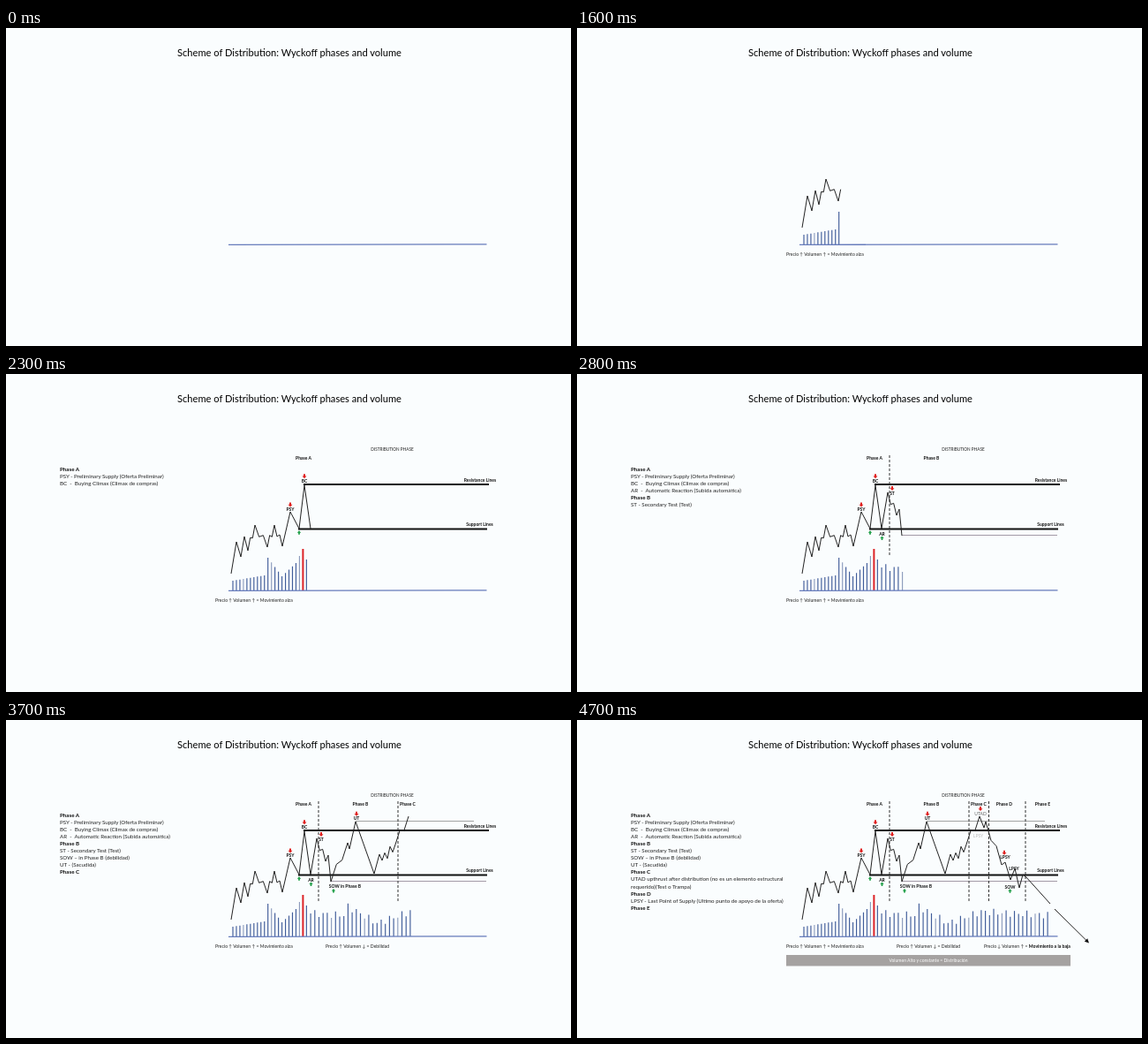
An HTML page that plays this animation: 640x360 px, repeating every 5 s.

```html
<!DOCTYPE html>
<html lang="en">
<head>
<meta charset="utf-8">
<title>Scheme of Distribution</title>
<style>
  html, body { margin: 0; width: 100%; height: 100%; overflow: hidden; background: #fafdfe; }
  svg { display: block; width: 100%; height: 100%; }
  text { font-family: Lato, "DejaVu Sans", sans-serif; fill: #222; white-space: pre; }
  .b { font-weight: 700; fill: #111; }
</style>
</head>
<body>
<svg id="stage" viewBox="0 0 640 360"></svg>
<script>
const LOOP = 5000, STEP = 100;
const stage = document.getElementById('stage');
const parts = [];

// Linear interpolation through [input, value] keys
function along(keys, v) {
  if (v >= keys.at(-1)[0]) return keys.at(-1)[1];
  const i = Math.max(1, keys.findIndex(k => k[0] > v));
  const [a, p] = keys[i - 1], [b, q] = keys[i];
  return p + (q - p) * (v - a) / (b - a);
}

// A part appears once the drawing edge has reached its "from"
function add(tag, attrs, from = 0, text) {
  const el = document.createElementNS('http://www.w3.org/2000/svg', tag);
  for (const k in attrs) el.setAttribute(k, attrs[k]);
  if (text) el.textContent = text;
  stage.appendChild(el);
  if (from) parts.push({ el, from });
  return el;
}
const line = (from, x1, y1, x2, y2, stroke, width, more) =>
  add('line', { x1, y1, x2, y2, stroke, 'stroke-width': width, ...more }, from);
const label = (from, x, y, size, text, more) =>
  add('text', { x, y, 'font-size': size, ...more }, from, text);
const mid = { 'text-anchor': 'middle' };
const bold = { class: 'b' };
const midBold = { ...mid, ...bold };

label(0, 321, 32, 11.12, 'Scheme of Distribution: Wyckoff phases and volume', { ...mid, style: 'fill:#000' });

// Volume: a rough envelope, with ripple after the climax
const BARS = 63, CLIMAX = 20;
const envelope = [[0, 234], [9, 228], [10, 208], [14, 229], [18, 214], [CLIMAX, 198], [21, 210],
  [22, 219], [30, 221], [31, 211], [38, 230], [46, 217], [62, 221]];
for (let i = 0; i < BARS; i++) {
  const x = i < 22 ? 257 + 3.97 * i : 340.4 + 4.7 * (i - 21);
  const y = along(envelope, i) + (i > 22 ? 4 * Math.sin(2.4 * i) : 0);
  const color = i === CLIMAX ? '#dc2226' : i % 8 === 3 ? '#8d9cbd' : '#3f5b99';
  line(x, x, y, x, 245, color, i === CLIMAX ? 2 : 1.15);
}
line(0, 252, 245.4, 544.5, 244.9, '#667bbb', 1.3);

// Levels
line(338, 337, 125, 547, 125, '#111', 2);
line(340, 331, 175.5, 545, 175.5, '#111', 2);
line(368, 368, 182.5, 544, 182.5, '#9a8f9c', 0.9);
line(396, 396, 114.5, 530, 114.5, '#999', 0.9);
label(338, 537, 122, 5, 'Resistance Lines', midBold);
label(340, 536.5, 172, 5, 'Support Lines', midBold);

// Phases: name, label position, left border
[['A', 337, 0], ['B', 401.5, 354], ['C', 455, 444], ['D', 484, 466.5], ['E', 527.5, 508]].forEach(([name, x, border]) => {
  label(border || 310, x, 97, 5, 'Phase ' + name, midBold);
  if (border) line(border, border, 92, border, 207, '#333', 1, { 'stroke-dasharray': '3 2' });
});
label(315, 437.5, 87, 4.7, 'DISTRIBUTION PHASE', mid);

// Price: swings [x, y, pullbacks on the way]
const swings = [[255, 226], [261, 190], [266, 207], [270, 184], [274, 200], [282, 171, 1], [296, 196, 1],
  [304, 171, 1], [313, 195, 1], [322, 156], [332, 175], [338, 126], [345, 175], [352, 134], [362, 160, 1],
  [365, 153], [368, 183], [387, 139, 1], [389, 146], [396, 115], [417, 174], [423, 152], [426, 159],
  [441, 141, 2], [456, 109, 1], [461, 122], [463, 115], [481, 164, 1], [485, 161], [491, 181],
  [496, 168], [501, 190], [505, 175], [508, 177], [536, 208]];
const PULLBACK = 5;
const points = swings.flatMap(([x, y, pulls = 0], i) => {
  const [x0, y0] = swings[i - 1] || [x, y];
  const n = 2 * pulls + 1;
  return Array.from({ length: n }, (_, j) => {
    const k = (j + 1) / n;
    const off = j === n - 1 ? 0 : PULLBACK * Math.sign(y - y0) * (j % 2 ? -1 : 1);
    return [x0 + (x - x0) * k, y0 + (y - y0) * k + off];
  });
});
const price = add('polyline', { fill: 'none', stroke: '#222', 'stroke-width': 1 });
line(570, 541, 214, 577, 249.5, '#222', 1);
add('path', { d: 'M580 252.5l-5.2 -1.8l3.4 -3.4z', fill: '#111' }, 570);

// Named turns: a high has its arrow above the label, a low has it below
function turn(text, x, y, low, dx = 0, more = bold) {
  const from = x + 2, flip = low ? ' scale(.9 -.9)' : '';
  add('path', {
    d: 'M-1 -2.5H1V-.3H2.5L0 2.5L-2.5 -.3H-1Z',
    fill: low ? '#22a04a' : '#e0201f',
    transform: `translate(${x} ${y + (low ? 3 : -7)})${flip}`
  }, from);
  label(from, x + dx, y, 5, text, { ...mid, ...more });
}
turn('PSY', 322, 155);
turn('BC', 338, 122.8);
turn('', 332, 176.5, true);
turn('AR', 345.5, 182.8, true);
turn('ST', 357, 136.5);
turn('SOW in Phase B', 371, 190.2, true, 13);
turn('UT', 397, 113.3);
turn('UTAD', 457, 107.5, false, 0, { style: 'fill:#666' });
turn('LPSY', 484, 157.3, false, 1);
turn('SOW', 490.5, 190.5, true);
label(496, 495, 170, 5, 'LPSY', midBold);
label(470, 454.5, 133, 5, 'LPSY', { ...mid, style: 'fill:#bbb' });

// Captions
const caption = (from, x, text) => label(from, x, 257.5, 5.12, text);
caption(260, 237, 'Precio ↑ Volumen ↑ = Movimiento alza');
caption(444, 362, 'Precio ↑ Volumen ↓ = Debilidad');
caption(540, 461, 'Precio ↓ Volumen ↑ = ').appendChild(add('tspan', bold, 0, 'Movimiento a la baja'));
add('rect', { x: 237, y: 266, width: 322, height: 12.5, fill: '#a5a2a1' }, 570);
label(570, 398, 274, 5.05, 'Volumen Alto y constante = Distribución', { ...mid, style: 'fill:#fff' });

// Legend
[[310, 'Phase A'],
  [322, 'PSY - Preliminary Supply (Oferta Preliminar)'],
  [338, 'BC  -  Buying Climax (Climax de compras)'],
  [347, 'AR  -  Automatic Reaction (Subida automática)'],
  [354, 'Phase B'],
  [357, 'ST - Secondary Test (Test)'],
  [371, 'SOW – in Phase B (debilidad)'],
  [397, 'UT - (Sacudida)'],
  [444, 'Phase C'],
  [459, 'UTAD upthrust after distribution (no es un elemento estructural'],
  [459, 'requerido)(Test o Trampa)'],
  [466, 'Phase D'],
  [485, 'LPSY - Last Point of Supply (Ultimo punto de apoyo de la oferta)'],
  [508, 'Phase E']]
  .forEach(([from, s], i) => label(from, 61, 110.2 + 8.03 * i, 6.2, s, s.startsWith('Phase') ? bold : {}));

// Drawing edge over time
const pace = [[1100, 255], [1600, 299], [2300, 345], [2800, 369], [3700, 458], [4200, 487], [4700, 580]];

function draw(ms) {
  const t = Math.floor(ms % LOOP / STEP) * STEP;
  const edge = t < 1200 ? 0 : along(pace, t);
  price.setAttribute('points', points.filter(p => p[0] <= edge).join(' '));
  parts.forEach(({ el, from }) => { el.style.display = edge >= from ? '' : 'none'; });
}

const origin = performance.now();
function tick() {
  draw(performance.now() - origin);
  requestAnimationFrame(tick);
}
tick();
</script>
</body>
</html>
```
